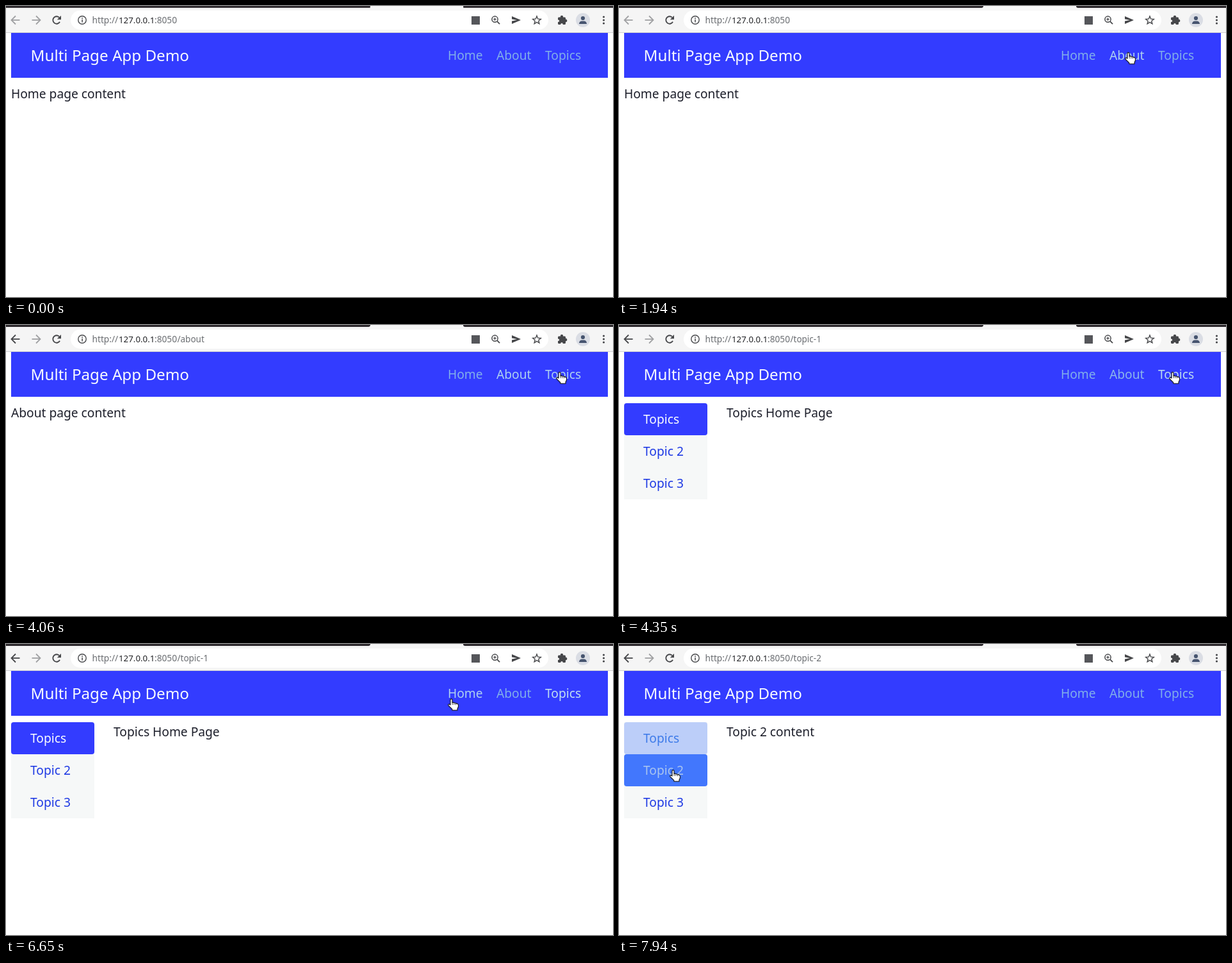
Animation of 948x454 px, one loop 8000 ms. Source, as an HTML page with a canvas:

```html
<!DOCTYPE html>
<html lang="en">
<head>
<meta charset="utf-8">
<title>Multi page app</title>
<style>
  html, body { margin: 0; width: 100%; height: 100%; overflow: hidden; background: #fff; }
  canvas { display: block; }
</style>
</head>
<body>
<canvas id="stage" width="948" height="454"></canvas>
<script>
const ctx = document.getElementById('stage').getContext('2d');
const LOOP = 8000, TICKS = 136;
const BLUE = [51, 60, 255], PANEL = [246, 248, 248], WHITE = [248, 251, 255];
const LINK = [31, 58, 228], LINK_DARK = [30, 46, 190];
const DIM = [128, 174, 234], BRIGHT = [192, 222, 242];
const INK = '#1d1f2b', ICON = '#46474a', FADED = '#a0a1a3';

// Pointer path: tick, left, top
const PATH = [
  [10, 142, 16], [11, 350, 62], [12, 555, 109], [16, 555, 109],
  [17, 556, 107], [18, 606, 92], [19, 680, 68], [20, 760, 49], [21, 817, 51],
  [22, 812, 58], [24, 798, 66], [26, 790, 72], [49, 790, 72],
  [51, 802, 69], [53, 838, 70], [55, 859, 73], [101, 859, 73],
  [102, 774, 79], [104, 732, 82], [107, 712, 77], [112, 712, 77],
  [113, 690, 85], [115, 430, 156], [117, 220, 213], [119, 140, 233],
  [120, 118, 235], [122, 105, 215], [124, 89, 201], [126, 79, 196], [136, 79, 196]
];

const HAND = new Path2D('M4 10V2.2Q4 .6 5.5 .6T7 2.2V6.6Q8.5 5.6 9.8 7Q11.3 6.2 12.6 7.8' +
  'Q14 7.2 15 8.4Q16.4 8.8 16.4 10.4V13L15 16V18.2H6.8V16.6L1.2 11.2Q.1 9.6 1.4 9Q2.6 8.6 4 10Z');
const KNUCKLES = new Path2D('M7.2 6.6V10M9.9 7.4V10M12.6 8V10.2');
const ARROW = new Path2D('M1 1V16L4.6 12.6L7 18L9.4 17L7 11.8H12Z');
const BEAM = new Path2D('M1 1H3.2Q4.5 1 4.5 2.5V14.5Q4.5 16 3.2 16H1M8 1H5.8Q4.5 1 4.5 2.5V14.5Q4.5 16 5.8 16H8');
const PLANE = new Path2D('M790 16L804 22L790 28V23.4L798 22L790 20.6Z');

const ramp = (n, a, b) => Math.max(0, Math.min(1, (n - a) / (b - a)));
const mix = (a, b, p) => `rgb(${a.map((v, i) => Math.round(v + (b[i] - v) * p)).join()})`;

function rect(x, y, w, h, fill, r = 0) {
  ctx.fillStyle = fill;
  ctx.beginPath();
  ctx.roundRect(x, y, w, h, r);
  ctx.fill();
}

function disc(x, y, r, fill) {
  ctx.fillStyle = fill;
  ctx.beginPath();
  ctx.arc(x, y, r, 0, 7);
  ctx.fill();
}

function ring(x, y, r, width, from = 0, to = 7) {
  ctx.lineWidth = width;
  ctx.strokeStyle = ICON;
  ctx.beginPath();
  ctx.arc(x, y, r, from, to);
  ctx.stroke();
}

function line(color, width, ...pts) {
  ctx.strokeStyle = color;
  ctx.lineWidth = width;
  ctx.beginPath();
  for (let i = 0; i < pts.length; i += 2) ctx.lineTo(pts[i], pts[i + 1]);
  ctx.stroke();
}

function text(str, x, y, fill, size = 19.2) {
  ctx.font = `${size}px "Noto Sans", "Open Sans", sans-serif`;
  ctx.fillStyle = fill;
  ctx.fillText(str, x, y);
}

function arrowIcon(x, dir, color) {
  line(color, 1.8, x - 6.5 * dir, 22, x + 6.5 * dir, 22);
  line(color, 1.8, x, 15.5, x + 6.5 * dir, 22, x, 28.5);
}

function star(x, y) {
  ctx.beginPath();
  for (let i = 0; i < 10; i++) {
    const r = i % 2 ? 2.9 : 6.6, a = i * Math.PI / 5 - Math.PI / 2;
    ctx.lineTo(x + r * Math.cos(a), y + r * Math.sin(a));
  }
  ctx.closePath();
  ctx.strokeStyle = ICON;
  ctx.lineWidth = 1.4;
  ctx.stroke();
}

function drawBrowser(n) {
  rect(0, 0, 948, 41, '#f5f5f5');
  rect(0, 41, 948, 1, '#cfcfd1');
  for (const [x, w, r] of [[0, 569, [0, 0, 3, 0]], [714, 234, [0, 0, 0, 3]]]) {
    rect(x, 0, w, 3, '#2d292d', r);
    if (n < 33) rect(x, 2, w, 1, '#454145', r);
  }
  rect(101, 7, 746, 30, '#fff', 15);

  arrowIcon(15, -1, n < 37 ? FADED : ICON);
  arrowIcon(47, 1, FADED);
  ring(79, 22, 5.7, 1.9, 0.5, 5.5);
  ctx.fillStyle = ICON;
  ctx.fill(new Path2D('M86 15V21.2H79.8Z'));

  ring(119, 22, 6.2, 1.4);
  rect(118.3, 21, 1.5, 4.5, ICON);
  rect(118.3, 18.3, 1.5, 1.6, ICON);

  const page = n < 37 ? '' : n < 70 ? '/about' : n < 131 ? '/topic-1' : '/topic-2';
  text('http://', 134.5, 27, '#6a6d71', 13.7);
  text('127.0.0.1', 176, 27, '#202124', 13.3);
  text(':8050', 232, 27, '#6a6d71', 13.7);
  text(page, 267.5, 27, '#6a6d71', 13.5);

  rect(727, 16, 13, 13, '#55565a');
  ring(763.5, 20.7, 4.6, 1.5);
  line(ICON, 1.8, 767, 24.2, 771, 28.2);
  line(ICON, 1.2, 761.2, 20.7, 765.8, 20.7);
  line(ICON, 1.2, 763.5, 18.4, 763.5, 23);
  ctx.fillStyle = ICON;
  ctx.fill(PLANE);
  star(829, 22.5);

  rect(862, 17.5, 12, 11.5, ICON, 1.5);
  disc(868, 17, 2.2, ICON);
  disc(874.2, 23, 2.2, ICON);
  disc(862.3, 23.3, 1.8, '#f5f5f5');
  disc(868, 28.8, 1.8, '#f5f5f5');

  disc(901, 22, 11, '#dadde4');
  disc(901, 19, 3.1, '#46546f');
  rect(895, 23.5, 12, 4.5, '#46546f', [5, 5, 0, 0]);
  for (const y of [17, 22, 27]) disc(933.5, y, 1.6, ICON);
}

function drawNav(n) {
  rect(8, 42, 932, 70, mix(BLUE, BLUE, 0));
  text('Multi Page App Demo', 38.5, 86, mix(WHITE, WHITE, 0), 24.2);
  const home = 0.7 * (ramp(n, 104, 107) - ramp(n, 113, 116));
  const about = 0.7 * (ramp(n, 21, 24) - ramp(n, 70, 74) + ramp(n, 102, 104) - ramp(n, 104, 107));
  const topics = 0.7 * ramp(n, 52, 55) + 0.3 * ramp(n, 70, 74) - ramp(n, 131, 134);
  text('Home', 690, 84, mix(DIM, BRIGHT, home));
  text('About', 766, 84, mix(DIM, BRIGHT, about));
  text('Topics', 842, 84, mix(DIM, BRIGHT, topics));
}

function drawTopics(n) {
  const swap = 0.75 * ramp(n, 133, 135);
  const on = ramp(n, 70, 73);
  const dark2 = ramp(n, 120, 122), dark3 = ramp(n, 117, 119) - ramp(n, 121, 123);
  rect(8, 122, 130, 150, mix(PANEL, PANEL, 0));
  rect(8, 122, 130, 50, swap ? mix(BLUE, [234, 255, 247], swap) : mix(PANEL, BLUE, on), 4);
  if (swap) rect(8, 172, 130, 50, mix(PANEL, [6, 76, 255], swap), 4);
  text('Topics', 38, 154, swap ? mix(WHITE, [0, 80, 225], swap) : mix(LINK, WHITE, on));
  text('Topic 2', 38, 204, swap ? mix(LINK_DARK, [214, 246, 255], swap) : mix(LINK, LINK_DARK, dark2));
  text('Topic 3', 38, 254, mix(LINK, LINK_DARK, dark3));
  text(n < 133 ? 'Topics Home Page' : 'Topic 2 content', 168, 144, INK);
}

function drawPointer(n) {
  if (n < 10) return;
  const i = Math.max(1, PATH.findIndex(k => k[0] >= n));
  const [t0, x0, y0] = PATH[i - 1], [t1, x1, y1] = PATH[i];
  const p = ramp(n, t0, t1);
  ctx.save();
  ctx.translate(Math.round(x0 + (x1 - x0) * p), Math.round(y0 + (y1 - y0) * p));
  ctx.lineJoin = 'round';
  if (n === 10) {
    ctx.strokeStyle = '#222';
    ctx.lineWidth = 1.2;
    ctx.stroke(BEAM);
  } else {
    const shape = n === 11 ? ARROW : HAND;
    ctx.save();
    ctx.shadowColor = 'rgba(0,0,0,.35)';
    ctx.shadowBlur = 1.5;
    ctx.shadowOffsetY = 0.8;
    ctx.fillStyle = '#fff';
    ctx.fill(shape);
    ctx.restore();
    ctx.strokeStyle = '#151515';
    ctx.lineWidth = 1.1;
    ctx.stroke(shape);
    if (shape === HAND) {
      ctx.lineWidth = 0.8;
      ctx.stroke(KNUCKLES);
    }
  }
  ctx.restore();
}

function draw(now) {
  const n = Math.floor((now % LOOP) / LOOP * TICKS + 0.03) % TICKS;
  ctx.fillStyle = '#fff';
  ctx.fillRect(0, 0, 948, 454);
  drawBrowser(n);
  drawNav(n);
  if (n < 71) text(n < 39 ? 'Home page content' : 'About page content', 8, 144, INK);
  else drawTopics(n);
  drawPointer(n);
}

const start = performance.now();
function loop() {
  draw(performance.now() - start);
  requestAnimationFrame(loop);
}
loop();
</script>
</body>
</html>
```
